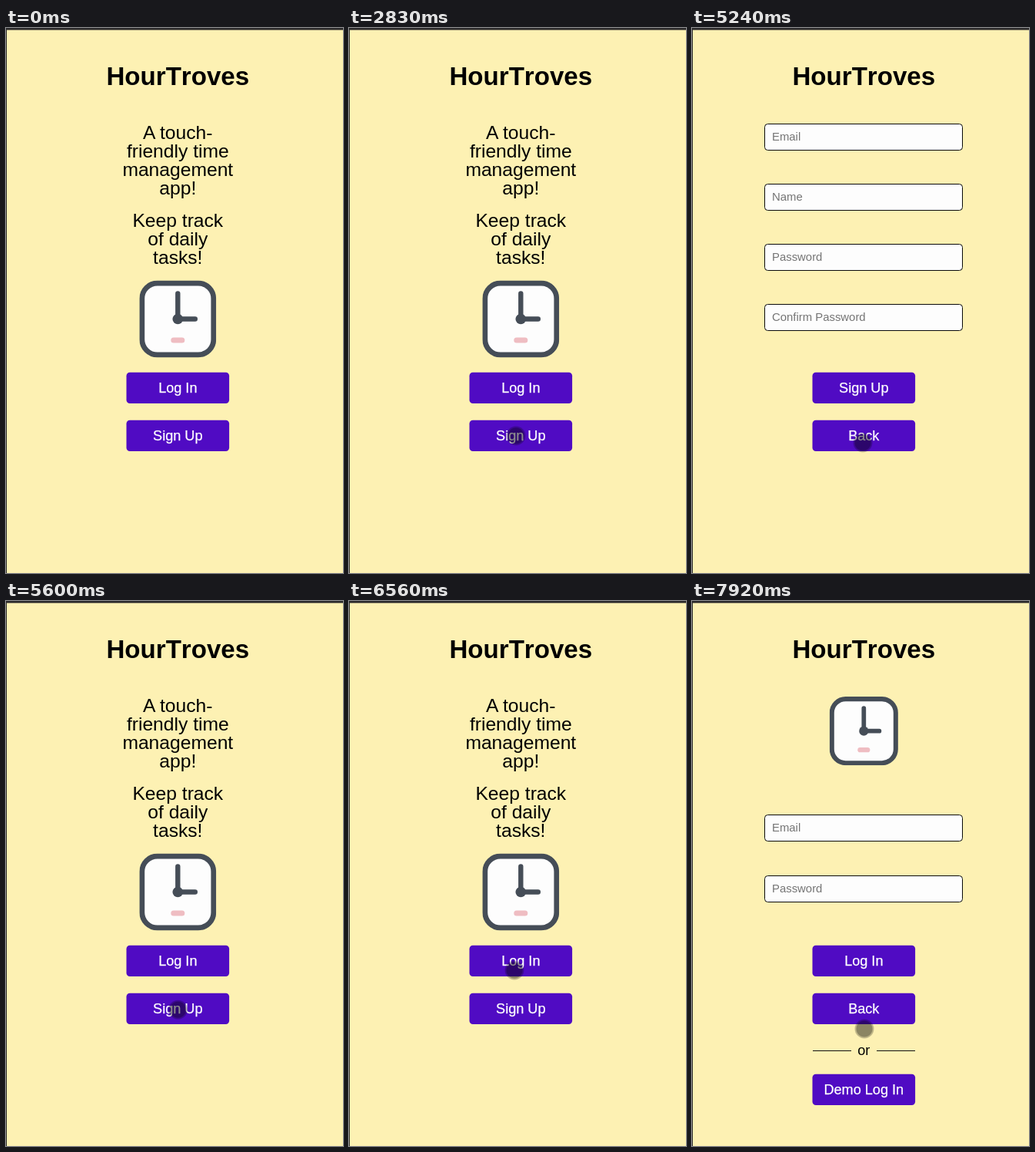
Animation of 438x707 px, one loop 8 s. Source, as an HTML page:

```html
<!DOCTYPE html>
<html lang="en">
<head>
<meta charset="utf-8">
<title>HourTroves</title>
<style>
  html, body { margin: 0; width: 100%; height: 100%; overflow: hidden; background: #fdf1b3; }
  svg { display: block; }
  text { font-family: "Liberation Sans", Arial, sans-serif; }
  .title { font-size: 33.1px; font-weight: bold; font-kerning: none; }
  .intro { font-size: 24.65px; }
  .label, .or { font-size: 18.1px; }
  .title, .intro, .label, .or { text-anchor: middle; }
  .label { fill: #fff; stroke: #fff; stroke-width: .25px; }
  .hint { font-size: 14.9px; fill: #757575; }
  .button { fill: #500bc3; }
  .field { fill: #fdfdfd; stroke: #0a0a0a; }
  .status { font: 12.8px "Open Sans", "Noto Sans", sans-serif; fill: #c3c6ca; }
</style>
</head>
<body>
<svg width="438" height="707" viewBox="0 0 438 707">
  <defs>
    <radialGradient id="shade">
      <stop offset="0" stop-opacity=".45"/>
      <stop offset=".8" stop-opacity=".45"/>
      <stop offset=".87" stop-opacity=".27"/>
      <stop offset="1" stop-opacity=".2"/>
    </radialGradient>
    <symbol id="clock" viewBox="0 0 100 100">
      <rect x="3.500" y="3.500" width="93" height="93" rx="20" fill="#fdfdfd" stroke="#454d57" stroke-width="6.800"/>
      <path d="M50 17V50H72.5" fill="none" stroke="#454d57" stroke-width="6.4" stroke-linecap="round"/>
      <circle cx="50" cy="50" r="6.8" fill="#454d57"/>
      <rect x="41" y="74" width="18" height="7" rx="3.5" fill="#efbdc2"/>
    </symbol>
  </defs>
  <rect width="438" height="707" fill="#fdf1b3"/>
  <rect width="438" height="2.6" fill="#2b2a2b"/>
  <rect width="1" height="707" fill="#2b2a2b"/>
  <text class="title" x="223.3" y="74">HourTroves</text>
  <g id="home"></g>
  <g id="signup"></g>
  <g id="login"></g>
  <g id="status">
    <path d="M1 683H119.500Q123 683 123 686.500V699.500H1Z" fill="#35393d"/>
    <text class="status" x="6" y="695.5">Waiting for time-...</text>
  </g>
  <circle id="touch" r="12.5" fill="url(#shade)"/>
</svg>
<script>
const LOOP = 8000, STEP = 95, MID = 223.3;

const $ = id => document.getElementById(id);
const text = (cls, x, y, s) => `<text class="${cls}" x="${x}" y="${y}">${s}</text>`;
const button = (y, s) =>
  `<rect class="button" x="${MID - 66.8}" y="${y - .2}" width="133.600" height="40.200" rx="4.500"/>` +
  text('label', MID, y + 25.7, s);
const field = (y, s) =>
  `<rect class="field" x="94.500" y="${y + .5}" width="257" height="34" rx="4"/>` +
  text('hint', 104, y + 22.3, s);
const clock = (y, size, id) =>
  `<use id="${id}" href="#clock" x="${MID - size / 2}" y="${y}" width="${size}" height="${size}"/>`;

// Stack items from a first position at an even distance
const stack = (y, gap, items, make) => items.map((s, i) => make(y + gap * i, s)).join('');
const intro = (y, s) => text('intro', MID, y, s);
const buttons = (...names) => stack(447, 62, names, button);

$('home').innerHTML =
  stack(144.3, 24, ['A touch-', 'friendly time', 'management', 'app!'], intro) +
  stack(258.3, 24, ['Keep track', 'of daily', 'tasks!'], intro) +
  clock(327.5, 100, 'homeClock') + buttons('Log In', 'Sign Up');

$('signup').innerHTML =
  stack(124, 78, ['Email', 'Name', 'Password', 'Confirm Password'], field) +
  buttons('Sign Up', 'Back');

$('login').innerHTML =
  clock(124, 89.3, 'loginClock') +
  stack(277, 79, ['Email', 'Password'], field) +
  buttons('Log In', 'Back') + button(614, 'Demo Log In') +
  '<path d="M157 583.500H207M240 583.500H290" stroke="#111"/>' +
  text('or', MID, 589, 'or');

// Each drag continues from the last point: start, end, target x, y
const origin = [116, 541];
const drags = [
  [900, 980, 168, 545],
  [1700, 1700, 174, 543],
  [1780, 2470, 232, 497],
  [2560, 2830, 217, 529],
  [4110, 4320, 219, 535],
  [5240, 5240, 222, 538],
  [5600, 5990, 229.5, 499],
  [6085, 6380, 220, 483],
  [6460, 6560, 215, 479],
  [7250, 7630, 216, 475],
  [7840, 7920, 224, 555]
];

// The pointer moves in even steps along the current drag
function touchAt(t) {
  const i = drags.findLastIndex(d => t >= d[0]);
  if (i < 0) return null;
  const [start, end, ...to] = drags[i];
  const from = i ? drags[i - 1].slice(2) : origin;
  const gaps = Math.round((end - start) / STEP);
  const done = gaps && Math.min(gaps, Math.floor((t - start) / (end - start) * gaps + .01));
  const u = (done + 1) / (gaps + 1);
  return from.map((v, k) => v + (to[k] - v) * u);
}

const show = (id, on) => $(id).setAttribute('visibility', on ? 'inherit' : 'hidden');

function draw(t) {
  const page = t < 3520 ? 'home' : t < 5310 ? 'signup' : t < 6950 ? 'home' : 'login';
  for (const id of ['home', 'signup', 'login']) show(id, id === page);
  show('homeClock', t < 3520 || t >= 5600);
  show('status', t >= 6950 && t < 7250);
  const pos = touchAt(t);
  show('touch', pos);
  if (pos) $('touch').setAttribute('transform', `translate(${pos})`);
}

const begin = performance.now();
function tick() {
  draw((performance.now() - begin) % LOOP);
  requestAnimationFrame(tick);
}
tick();
</script>
</body>
</html>
```
